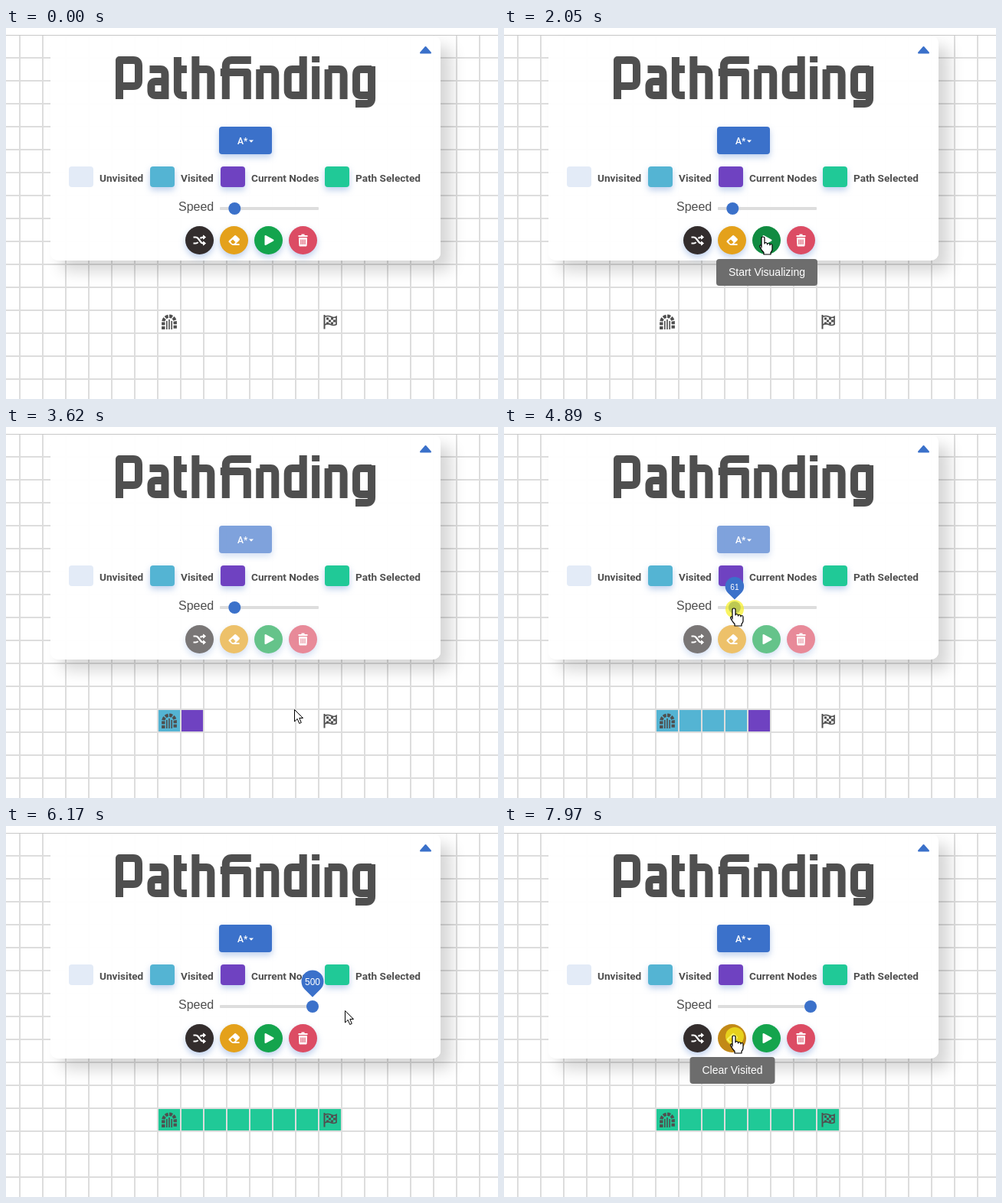
Animation of 642 by 485 pixels, one loop 8 s. Source, as an HTML page:

```html
<!DOCTYPE html>
<html lang="en">
<head>
<meta charset="utf-8">
<title>Pathfinding</title>
<style>
html, body { margin: 0; width: 100%; height: 100%; overflow: hidden; background: #fff; }
#grid {
  position: absolute; top: 9px; left: 0; width: 642px; height: 476px; overflow: hidden;
  background:
    linear-gradient(#c8c8c8 1px, #0000 0) 0 0 / 100% 476px,
    linear-gradient(90deg, #ddd 2px, #0000 0) 17px 0 / 30px 30px,
    linear-gradient(#ddd 2px, #0000 0) 0 -1px / 30px 30px;
}
#panel {
  position: absolute; left: 58px; top: 1px; width: 509px; height: 294px; border-radius: 10px;
  background: #fffffff5; box-shadow: 14px 14px 20px #00000029;
}
svg { position: absolute; left: 0; top: 0; font: 14px "Liberation Sans", Arial, sans-serif; }
.line { fill: none; stroke: #4f4f4f; }
.white { fill: #fff; stroke: #fff; stroke-linejoin: round; }
.label { font: bold 13.6px Roboto, sans-serif; fill: #4f4f4f; }
.lift { filter: drop-shadow(0 4px 4px #3b71ca55); }
.tip text { fill: #fff; text-anchor: middle; }
</style>
</head>
<body>
<div id="grid"><div id="panel"></div></div>
<svg width="642" height="485" viewBox="0 0 642 485">
  <g id="cells"></g>

  <!-- gate and flag -->
  <g class="line">
    <path d="M205.300 394V384.500a7.700 7.700 0 0 1 15.400 0V394" stroke-width="4.400" stroke-dasharray="4 1.400" />
    <path d="M209.800 394V383M213 394V381M216.200 394V383" stroke-width="1.600" />
    <path d="M415.500 375V393.500" stroke-width="2" />
    <path d="M416 377.500q4-2 8 0t7 0v10q-3.500 2-7.500 0t-7.500 .5" stroke-width="1.700" />
    <path d="M418 380H430M421 383H431M418 386H430" stroke-width="3" stroke-dasharray="3" />
  </g>

  <path id="title" class="line" role="img" aria-label="Pathfinding" stroke-width="10" stroke-linejoin="round" />
  <path d="M541 32.500L547.500 25 554 32.500z" fill="#3b71ca" stroke="#3b71ca" stroke-linejoin="round" stroke-width="2" />

  <g class="dim">
    <rect class="lift" x="278" y="129" width="69" height="36" rx="4" fill="#3b71ca" />
    <text x="302" y="152" fill="#fff" style="font: 500 12px Roboto, sans-serif">A*</text>
    <path d="M317 146.500h6l-3 3.300z" fill="#fff" />
  </g>

  <g id="legend"></g>

  <text x="225" y="239" font-size="16" fill="#4f4f4f">Speed</text>
  <rect x="279" y="234" width="129" height="4" rx="1" fill="#ddd" />
  <circle id="thumb" cy="236" r="8" fill="#3b71ca" />
  <g id="bubble">
    <path d="M0-12.400L-10.300-22.700A14.600 14.600 0 1 1 10.300-22.700z" fill="#3b71ca" />
    <text id="value" y="-28" font-size="12" fill="#fff" text-anchor="middle"></text>
  </g>

  <g id="buttons"></g>
  <g id="tips"></g>

  <circle id="press" r="12" fill="#f6f020" opacity=".7" />
  <g id="cursor" fill="#fff" stroke="#000" stroke-linejoin="round">
    <path id="arrow" d="M.5.5V16l3.700-3.500 2.500 6 2.600-1.100-2.500-5.900H11.500z" />
    <path id="hand" stroke-width="1.200" d="M-3 13V1q0-2 2-2t2 2v7q0-1.500 1.500-1.500t2 1.500v1q0-1.500 1.500-1.500t2 1.500v1q0-1.500 1.500-1.500t1.500 2v5q0 2-2 4v2.500h-9v-2.500q-3-3-5-7-1-2 .5-2.500t1.500 2.500z" />
  </g>
</svg>
<script>
const LOOP = 8000;
const BLUE = '#54b4d3', PURPLE = '#6f42c1', GREEN = '#20c997';
const $ = id => document.getElementById(id);
const all = selector => [...document.querySelectorAll(selector)];

// display lettering: one stroke per glyph, set with even gaps
const arch = 'M5 54H19Q25 54 25 61V93';
const bowl = 'M25 54H11Q5 54 5 61V81Q5 88 11 88H25';
const glyphs = {
  P: [35, 'M5 93V42H23Q30 42 30 49V69Q30 76 23 76H5'],
  a: [28, 'M3 54H17Q23 54 23 61V93M23 70H11Q5 70 5 76V82Q5 88 11 88H23'],
  t: [17, 'M5 38V81Q5 88 12 88H17M0 54H17'],
  h: [30, 'M5 37V93' + arch],
  fi: [41, 'M8 93V50Q8 42 16 42H41M1 58H36V93'],
  n: [30, 'M5 93V54' + arch],
  d: [30, 'M25 37V93' + bowl],
  i: [10, 'M5 37V45M5 50V93'],
  g: [30, bowl + 'M25 50V92Q25 99 18 99H4'],
};
let left = 143;
$('title').setAttribute('d', 'P a t h fi n d i n g'.split(' ').map(name => {
  const [width, path] = glyphs[name];
  // move each absolute x by the pen position
  const placed = path.replace(/([MHQ ]?)([MHVQ])([^MHVQ]*)/g, (_, gap, cmd, args) =>
    cmd + args.trim().split(' ').map((v, i) => cmd !== 'V' && i % 2 === 0 ? +v + left : v).join(' '));
  left += width + 6.45;
  return placed;
}).join(''));

$('legend').innerHTML = [
  [82, '#e3ebf7', 'Unvisited'], [188, BLUE, 'Visited'],
  [280, PURPLE, 'Current Nodes'], [416, GREEN, 'Path Selected'],
].map(([x, color, name], i) => `
  <rect ${i ? 'class="lift"' : ''} x="${x}" y="181" width="32" height="27" rx="4" fill="${color}"/>
  <text class="label" x="${x + 40}" y="201">${name}</text>`).join('');

// icons are drawn around the centre of each button
const buttonX = i => 252.5 + 45 * i, BUTTON_Y = 277.5;
$('buttons').innerHTML = [
  ['#332d2d', `<path fill="none" stroke-width="2.200" d="M-8-4h3q2 0 3.500 2l3 4Q3 4 5 4h1M-8 4h3q2 0 3-1.500M1-2.500Q3-4 5-4h1"/>
    <path d="M5-6.500L8-4 5-1.500zM5 1.500L8 4 5 6.500z"/>`],
  ['#e4a11b', `<path d="M-6.500 1L1-6Q2-6.500 3-5.500L6.500-2Q7.500-1 6.500 0L1 5.500H-3L-6.500 2z"/>
    <path stroke-width="2" d="M-2 5.500H7"/>
    <path d="M-4.500 1.500L-1.500-1 2 2.500 0 4.500H-2.500z" fill="#e4a11b" stroke="none"/>`],
  ['#14a44d', '<path stroke-width="2" d="M-4-5.500L6 0-4 5.500z"/>'],
  ['#dc4c64', `<path stroke-width="2" d="M-6-5.500H6M-2-7H2"/><path d="M-5-3H5L4.500 7.500h-9z"/>
    <path stroke="#dc4c64" stroke-width="1.200" d="M-2.500-1V5.500M0-1V5.500M2.500-1V5.500"/>`],
].map(([color, icon], i) => `
  <g class="dim" transform="translate(${buttonX(i)} ${BUTTON_Y})">
    <circle class="face lift" r="18.500" fill="${color}"/><g class="white">${icon}</g>
  </g>`).join('');

const ERASE = 1, PLAY = 2;
const tipOwners = [ERASE, PLAY];
$('tips').innerHTML = [[111, 'Clear Visited'], [132, 'Start Visualizing']].map(([w, text], i) => {
  const x = Math.round(buttonX(tipOwners[i]));
  return `<g class="tip"><rect x="${x - w / 2}" y="302" width="${w}" height="35" rx="4" fill="#6d6d6d"/>
    <text x="${x}" y="324">${text}</text></g>`;
}).join('');

$('cells').innerHTML = Array.from({ length: 8 }, (_, i) =>
  `<rect x="${199 + 30 * i}" y="370" width="28" height="28"/>`).join('');

const cells = all('#cells rect'), faces = all('.face'), dims = all('.dim'), tips = all('.tip');

const ramp = (t, from, to) => Math.min(1, Math.max(0, (t - from) / (to - from)));
const ease = p => p * p * (3 - 2 * p);
const show = (el, on) => { el.style.display = on ? '' : 'none'; };

// each move: start, end, destination
const moves = [
  [1190, 1990, 339, 274],
  [3120, 3620, 376, 369],
  [4030, 4430, 301, 238],
  [5000, 5810, 442, 241],
  [6640, 7400, 301, 275],
];
const mouse = t => moves.reduce(([x, y], [from, to, nextX, nextY]) => {
  const p = ease(ramp(t, from, to));
  return [x + (nextX - x) * p, y + (nextY - y) * p];
}, [550, 484]);

const hovered = t => {
  const [x, y] = mouse(t);
  return faces.findIndex((_, i) => Math.hypot(x - buttonX(i), y - BUTTON_Y) < 18.5);
};
// a tooltip fades with the share of the last 150 ms spent over its button
const tipAlpha = (t, owner) =>
  [0, 1, 2, 3, 4, 5].filter(k => hovered(t - 30 * k) === owner).length / 6;

// the search takes regular steps until the speed goes up
const visitTime = i => i < 6 ? 2650 + 555 * i : 5425 + 65 * (i - 5);
const pathTime = i => 5580 + 30 * i;
const cellColor = (i, t) =>
  t < visitTime(i) ? 'none' : t >= pathTime(i) ? GREEN : t < visitTime(i + 1) ? PURPLE : BLUE;

function draw(now) {
  const t = now % LOOP;
  const [x, y] = mouse(t), over = hovered(t);
  const busy = t >= 2790 && t < 5680;
  const dragging = t >= 4620 && t < 6170;
  const pressed = dragging || t >= 2660 && t < 2790 || t >= 7970;

  cells.forEach((cell, i) => cell.setAttribute('fill', cellColor(i, t)));
  const alpha = 1 - .35 * (ramp(t, 2790, 2940) - ramp(t, 5680, 5830));
  dims.forEach(el => { el.style.opacity = alpha; });
  faces.forEach((el, i) => { el.style.filter = i === over && !busy ? 'brightness(.85)' : ''; });
  tips.forEach((el, i) => { el.style.opacity = tipAlpha(t, tipOwners[i]); });

  // the thumb trails the pointer a little
  const thumbX = t < 4620 ? 298.3 : Math.min(400, mouse(t - 27)[0] - .1, t < 6170 ? 400 : Infinity);
  const knobX = t < 5810 ? thumbX : 400;
  const size = ramp(t, 4690, 4930) - ramp(t, 6170, 6370);
  $('thumb').setAttribute('cx', knobX);
  $('bubble').setAttribute('transform', `translate(${knobX} 236) scale(${size})`);
  $('value').textContent = Math.floor((knobX - 287) / .226);

  const spot = `translate(${x} ${y})`;
  const pointing = dragging || over >= 0 && !busy || t > 4380 && t < 4620;
  $('cursor').setAttribute('transform', spot);
  $('press').setAttribute('transform', spot);
  show($('cursor'), t >= 1190);
  show($('hand'), pointing);
  show($('arrow'), !pointing);
  show($('press'), pressed);

  requestAnimationFrame(draw);
}
requestAnimationFrame(draw);
</script>
</body>
</html>
```
